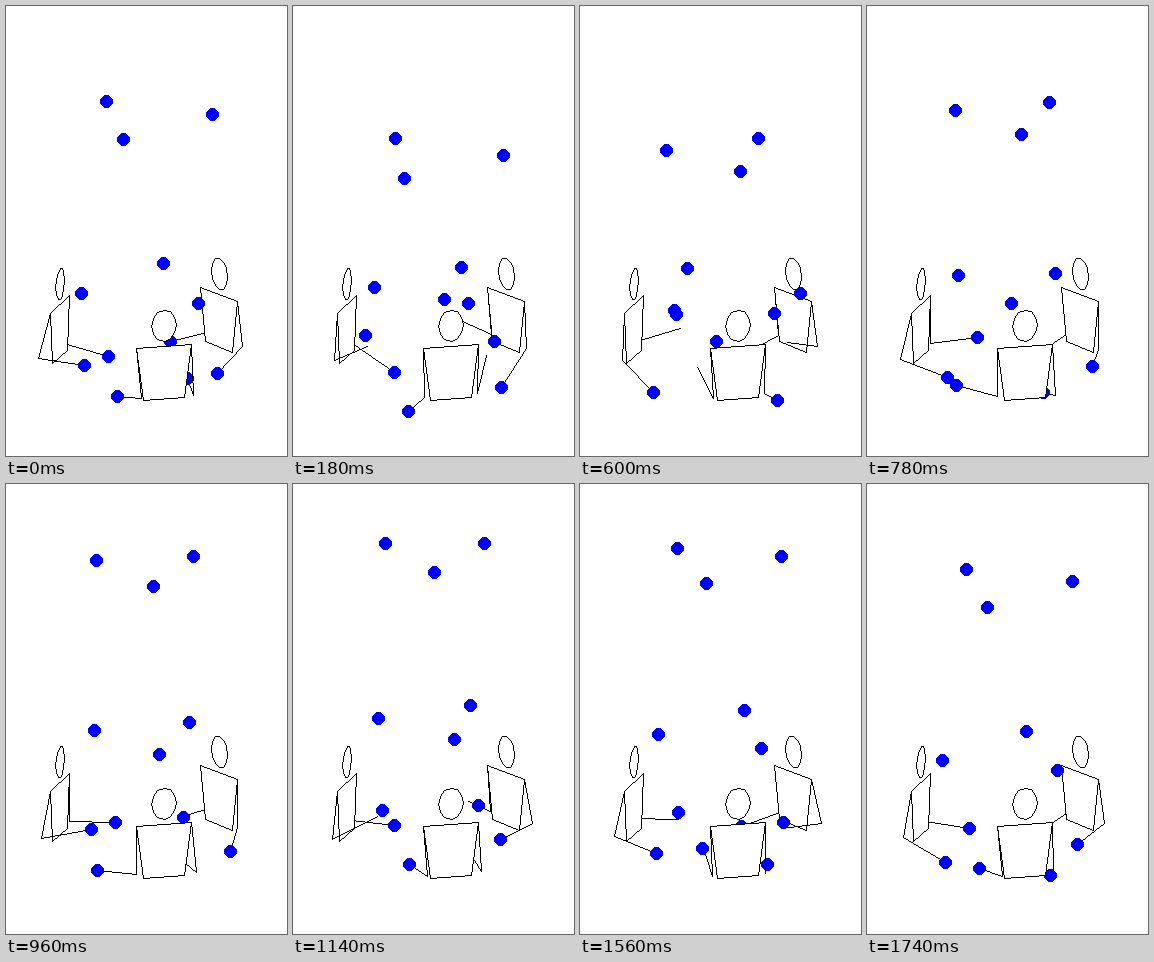
Animation of 281x450 px, one loop 1.8 s. Source, as an HTML page with a canvas:

```html
<!DOCTYPE html>
<html lang="en">
<head>
<meta charset="utf-8">
<title>Three jugglers</title>
<style>
html, body { margin: 0; width: 100%; height: 100%; overflow: hidden; background: #fff; }
canvas { display: block; }
</style>
</head>
<body>
<canvas id="stage" width="281" height="450"></canvas>
<script>
const ctx = document.getElementById('stage').getContext('2d');

const LOOP = 1800, STEP = 60;
const GRAVITY = 1.766e-4;         // half the acceleration, px per ms squared
const TILT = 0.334, RISE = 0.943; // camera: depth and height foreshortening
const REACH = 37.3;               // hands stay in a plane this far ahead
const THROW_Z = 46.5;             // below the shoulders
const SHOULDER = 28.1, WAIST = 21.2, TORSO = 52.4, ARM = 50.8;

// Everyone does the same routine, seen from three sides.
const makeJuggler = (x, y, degrees) => {
  const a = degrees * Math.PI / 180, c = Math.cos(a), s = Math.sin(a);
  return (side, ahead, down) => [
    x + side * c - ahead * s,
    y - TILT * (side * s + ahead * c) + down
  ];
};
const left = makeJuggler(53.6, 298.3, 250.4);
const front = makeJuggler(157.5, 340, 10.4);
const right = makeJuggler(212.6, 288.3, 130.4);

// Siteswap 7531: hands alternate and every throw crosses over.
const throws = [
  { at: 0, air: 2565, from: 31, to: -61.5 },
  { at: 450, air: 1665, from: -22.2, to: 57.5 },
  { at: 900, air: 765, from: 15, to: -36 },
  { at: 1200, air: 315, from: -24, to: 36 }
];

// A hand leaves each throw with the ball's velocity
// and passes each catch with continuous acceleration.
function makeHand(index) {
  const events = [];
  throws.forEach(({ at, air, from, to }, i) => {
    if (i % 2 === index) {
      events.push({ t: at, pos: [from, THROW_Z], vel: [(to - from) / air, -GRAVITY * air] });
    } else {
      events.push({ t: (at + air) % LOOP, pos: [to, THROW_Z], caught: true });
    }
  });
  events.sort((a, b) => a.t - b.t);
  const n = events.length;
  const gap = (a, b) => (b.t - a.t + LOOP) % LOOP;
  events.forEach((e, i) => {
    e.next = events[(i + 1) % n];
    e.span = gap(e, e.next);
    if (!e.caught) return;
    const prev = events[(i + n - 1) % n], h = gap(prev, e), k = e.span;
    e.vel = e.pos.map((p, d) =>
      (3 * (p - prev.pos[d]) / (h * h) + 3 * (e.next.pos[d] - p) / (k * k) -
        prev.vel[d] / h - e.next.vel[d] / k) / (2 / h + 2 / k));
  });
  return { shoulder: index ? -SHOULDER : SHOULDER, events };
}
const hands = [makeHand(0), makeHand(1)];

function poseAt({ shoulder, events }, t) {
  const e = events.find(e => (t - e.t + LOOP) % LOOP < e.span);
  const p = (t - e.t + LOOP) % LOOP / e.span, q = 1 - p;
  const pos = e.pos.map((a, d) =>
    q * q * (1 + 2 * p) * a + p * p * (3 - 2 * p) * e.next.pos[d] +
    e.span * p * q * (q * e.vel[d] - p * e.next.vel[d]));
  return { shoulder, pos, elbow: elbowAt(shoulder, pos), holding: e.caught };
}

// The elbow hangs in the upright plane through shoulder and hand.
function elbowAt(shoulder, [side, down]) {
  const du = side - shoulder, flat = Math.hypot(du, REACH), drop = down / RISE;
  const dist = Math.hypot(flat, drop);
  const bend = Math.sqrt(Math.max(0, ARM * ARM - dist * dist / 4));
  const k = (flat / 2 - bend * drop / dist) / flat;
  return [shoulder + du * k, REACH * k, (drop / 2 + bend * flat / dist) * RISE];
}

// Crisp one-pixel line
function line(a, b) {
  const [x0, y0] = a.map(Math.round), [x1, y1] = b.map(Math.round);
  const n = Math.max(Math.abs(x1 - x0), Math.abs(y1 - y0), 1);
  ctx.fillStyle = '#000';
  for (let i = 0; i <= n; i++) {
    ctx.fillRect(Math.round(x0 + (x1 - x0) * i / n), Math.round(y0 + (y1 - y0) * i / n), 1, 1);
  }
}

function shape(points) {
  ctx.fillStyle = '#fff';
  ctx.beginPath();
  points.forEach(([x, y]) => ctx.lineTo(Math.round(x) + 0.5, Math.round(y) + 0.5));
  ctx.fill();
  points.forEach((p, i) => line(p, points[(i + 1) % points.length]));
}

// Hard-edged disc, 13 pixels wide
function ball(point) {
  const [x, y] = point.map(Math.round);
  ctx.fillStyle = '#00f';
  for (let dy = -6; dy <= 6; dy++) {
    const w = Math.floor(Math.sqrt(40 - dy * dy));
    ctx.fillRect(x - w, y + dy, 2 * w + 1, 1);
  }
}

function body(view) {
  shape([
    view(-SHOULDER, 0, 0), view(SHOULDER, 0, 0),
    view(WAIST, 0, TORSO), view(-WAIST, 0, TORSO)
  ]);
  const head = [];
  for (let i = 0; i < 12; i++) {
    const a = i * Math.PI / 6;
    head.push(view(12.4 * Math.cos(a), 0, -20.8 + 15.6 * Math.sin(a)));
  }
  shape(head);
}

const upperArm = (view, h) => line(view(h.shoulder, 0, 0), view(...h.elbow));
const forearm = (view, h) => line(view(...h.elbow), view(h.pos[0], REACH, h.pos[1]));
const arm = (view, h) => { upperArm(view, h); forearm(view, h); };

function ballsAt(t, pose) {
  const list = pose.filter(h => h.holding).map(h => h.pos);
  for (const { at, air, from, to } of throws) {
    for (let s = (t - at + LOOP) % LOOP; s < air; s += LOOP) {
      list.push([from + (to - from) * s / air, THROW_Z - GRAVITY * s * (air - s)]);
    }
  }
  return list;
}

function draw(t) {
  ctx.fillStyle = '#fff';
  ctx.fillRect(0, 0, 281, 450);
  const pose = hands.map(h => poseAt(h, t));
  const [x, y] = pose;

  arm(right, x);
  body(right);
  arm(right, y);

  arm(left, y);
  body(left);
  arm(left, x);

  pose.forEach(h => forearm(front, h));
  const balls = ballsAt(t, pose);
  for (const view of [right, left, front]) {
    balls.forEach(([side, down]) => ball(view(side, REACH, down)));
  }
  pose.forEach(h => upperArm(front, h));
  body(front);
}

const begin = performance.now();
function tick() {
  const t = (performance.now() - begin) % LOOP;
  draw(Math.floor(t / STEP) * STEP);
  requestAnimationFrame(tick);
}
tick();
</script>
</body>
</html>
```
